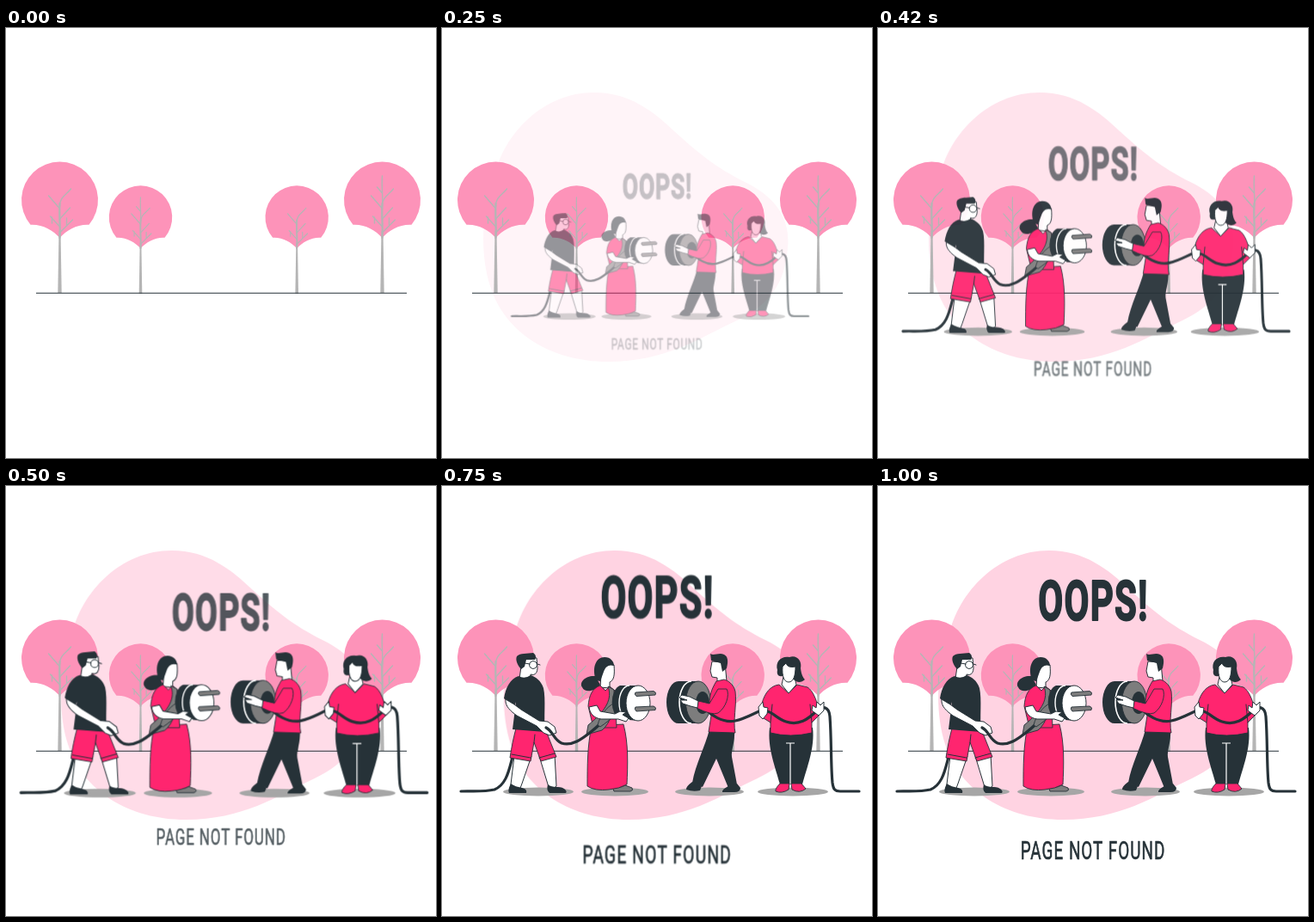
An HTML page that plays this animation: 500 by 500 pixels, repeating every 1040 ms.

```html
<!DOCTYPE html>
<html lang="en">
<head>
<meta charset="utf-8">
<title>Page not found</title>
<style>
  :root { --ink: #263238; --pink: #ff256f; --loop: 1040ms linear infinite; }
  html, body { margin: 0; width: 100%; height: 100%; overflow: hidden; background: #fff; }
  svg { display: block; width: 100%; height: 100%; }

  .reveal { animation: reveal var(--loop); }
  .blob { fill: #ffd3e2; animation: slide var(--loop); }
  .people { transform-origin: 253.5px 277px; animation: pop var(--loop); }
  .words { transform-origin: 250px 271px; animation: grow var(--loop); }

  @keyframes reveal {
    0% { visibility: hidden; animation-timing-function: step-end; }
    7.69%, 100% { visibility: visible; }
  }
  @keyframes slide {
    0% { opacity: 0; transform: translateX(-30px); animation-timing-function: cubic-bezier(.335, -.01, .487, 1.38); }
    93.75%, 100% { opacity: 1; transform: translateX(0); }
  }
  @keyframes grow {
    0% { opacity: 0; transform: scale(.5); animation-timing-function: cubic-bezier(.335, -.01, .487, 1.38); }
    93.75%, 100% { opacity: 1; transform: scale(1); }
  }
  @keyframes pop {
    0% { opacity: 0; transform: scale(.5); animation-timing-function: cubic-bezier(.34, -.01, .489, 1.38); }
    65.87%, 100% { opacity: 1; transform: scale(1); }
  }

  text {
    font-family: Roboto, "Liberation Sans", sans-serif; text-anchor: middle;
    fill: var(--ink); stroke: var(--ink); stroke-linejoin: round;
  }
  .title { font-size: 65.5px; font-weight: 700; letter-spacing: 2px; stroke-width: 2px; }
  .note { font-size: 29.5px; letter-spacing: 1.6px; stroke-width: .7px; }

  .d { fill: var(--ink); }
  .p { fill: var(--pink); stroke: var(--ink); stroke-width: .9; stroke-linejoin: round; }
  .w { fill: #fff; stroke: var(--ink); stroke-width: 1; stroke-linejoin: round; }
  .g { fill: #7d7d7d; stroke: var(--ink); stroke-width: .9; }
  .l { fill: none; stroke: var(--ink); stroke-width: 1; stroke-linecap: round; }
  .rope { fill: none; stroke: var(--ink); stroke-width: 3.2; stroke-linecap: round; stroke-linejoin: round; }
  .shade { fill: #a6a6a6; }
</style>
</head>
<body>
<svg viewBox="0 0 500 500">
  <defs>
    <g id="crown">
      <path fill="#fd93b9" d="M-34 28.7A44.5 44.5 0 1 1 34 28.7C20 28 8 35 0 44C-8 35-20 28-34 28.7Z"/>
      <path fill="#b5b5b5" d="M-1 36H1L2.2 108H-2.2Z"/>
    </g>
    <g id="twigs" fill="none" stroke="#b5b5b5" stroke-linecap="round">
      <path stroke-width="2.300" d="M0 44C1 30-1 20 0 4"/>
      <path stroke-width="1.4" d="M0 38L15 23M0 31L-11 19M0 22L12 9M0 10L-13-5M0 7C0-4 8-6 13-13M-9 27V20M8 21V29"/>
    </g>
    <g id="tree"><use href="#crown"/><use href="#twigs"/></g>
    <g id="tall">
      <use href="#tree"/>
      <path fill="none" stroke="#b5b5b5" stroke-width="1.4" stroke-linecap="round" d="M0 10C1-5-1-15 0-28M0-8L-6-15"/>
    </g>
  </defs>

  <g class="reveal">
    <path class="blob" d="M199 75C240 75 268 97 292 120C325 150 345 165 380 182C413 200 427 225 424 255C421 298 402 322 365 340C320 361 282 388 215 388C150 388 95 355 78 300C66 262 68 215 82 175C94 122 140 75 199 75Z"/>
  </g>

  <use href="#tree" x="62.5" y="200"/>
  <use href="#tall" transform="translate(156.5 220) scale(.825)"/>
  <use href="#tree" transform="translate(338.2 220) scale(.825)"/>
  <use href="#tall" x="437.5" y="200"/>
  <path d="M35 308.3H466" stroke="#263238" stroke-width="1.1"/>

  <g class="reveal">
    <g class="people">
      <g class="shade">
        <ellipse cx="112" cy="355.5" rx="41" ry="5"/>
        <ellipse cx="201" cy="355.5" rx="39" ry="5"/>
        <ellipse cx="311" cy="355.5" rx="40" ry="5"/>
        <ellipse cx="408" cy="355.5" rx="41" ry="5"/>
      </g>
      <path class="rope" d="M22 355C35 354.500 48 356 61 353C73 348 77 335 81 319C85 302 84 290 93 284"/>

      <!-- man with glasses -->
      <path class="w" d="M84 314L80 347L79 352L90 354L93 346L104 314Z"/>
      <path class="w" d="M113 314L124 350L128 353L133 349L131 312Z"/>
      <path class="d" d="M80 346C85 350 91 350 96 352Q99 354 98 357H78Q76 354 80 346ZM123 347C129 352 136 348 142 352Q146 355 144 357H125Q121 354 123 347Z"/>
      <path class="p" d="M86 282L121 285L133 315L115 320L107 298L103 320L79 316C81 303 83 293 86 282Z"/>
      <path class="l" d="M107 298L108 289M81 312L103 316M113 316L131 311"/>
      <path class="w" d="M92 210L90 224Q97 228 103 223L103 219C109 221 111 216 111 211L110 200L94 198Z"/>
      <path class="d" d="M89 221C79 224 74 235 72 247L84 257L86 251L82 283L120 286C118 270 121 248 118 235C115 226 109 222 103 220Q96 225 89 221Z"/>
      <path class="d" d="M87 198C91 194 99 195 106 194C109 196 110 199 108 202L98 202L96 210L92 213C88 209 85 202 87 198Z"/>
      <circle class="w" cx="106" cy="208" r="4.4"/>
      <path class="l" d="M96 206L102 207M111 207L114 208"/>
      <path class="w" d="M74 248C73 256 80 262 87 267L110 279L118 287L125 290L133 287L131 280L123 274L113 273L92 260L84 254Z"/>

      <!-- woman with plug -->
      <path class="g" d="M198 349Q207 352 213 348L221 351Q223 354 219 355H200Z"/>
      <path class="p" d="M174 279C169 302 169 326 169 349Q178 355 194 353Q206 352 215 347C216 325 217 299 211 277Z"/>
      <path class="d" d="M178 221C167 220 159 228 163 234C166 241 178 239 184 231Z"/>
      <path class="w" d="M185 220L184 234L195 235L195 228C200 226 201 220 200 208L187 206Z"/>
      <path class="p" d="M184 232C175 235 171 243 170 256L176 281L203 281L201 238L195 233L190 238Z"/>
      <path class="d" d="M179 226C174 211 179 199 189 199C196 199 200 204 200 209C194 207 190 210 188 216L184 227Z"/>
      <path class="g" d="M193 233C198 247 192 260 170 278L168 289L186 284C196 276 201 259 200 237Z"/>
      <path class="rope" d="M121 281C129 285 130 295 139 299C151 303 163 294 173 286C182 279 187 274 194 267"/>
      <path class="g" d="M181 278C184 266 191 258 199 253L202 266C196 271 190 276 184 280Z"/>
      <path class="d" d="M228 232H207A12 20 0 0 0 207 271L228 273Z"/>
      <path d="M218 232A12 20 0 0 0 218 272" fill="none" stroke="#fff" stroke-width="1.4"/>
      <ellipse class="w" cx="228" cy="252.5" rx="14" ry="20.5"/>
      <path class="g" d="M225 240L246 238.5Q250 240 248 243L226 244.5Q223 242 225 240ZM225 257L246 256Q250 257.500 248 260.500L226 262Q223 259 225 257Z"/>
      <path class="w" d="M171 257C172 266 178 270 185 271L205 271L214 274L217 270L210 266L214 263L207 262L201 265L184 262L180 255Z"/>

      <!-- socket -->
      <path class="d" d="M298 227H275A14 24.500 0 0 0 275 276H298Z"/>
      <path d="M290 227A14 24.500 0 0 0 290 276" fill="none" stroke="#fff" stroke-width="1.6"/>
      <ellipse class="g" cx="298" cy="251.500" rx="14.500" ry="24.500"/>
      <ellipse class="d" cx="303" cy="252" rx="8" ry="13"/>

      <!-- man with socket -->
      <path class="d" d="M311 283L340 284C341 298 336 307 337 315L343 347L333 351L319 317L303 350L291 345C295 323 306 303 311 283Z"/>
      <path class="d" d="M291 344L302 349L300 354Q292 356 284 353Q283 350 291 344ZM333 349L343 346L347 351Q347 356 340 356H326Q325 353 333 349Z"/>
      <path class="w" d="M314 204L312 215L314 222L320 223L320 230L331 227L329 205Z"/>
      <path class="p" d="M319 227C313 237 311 244 311 253L309 262L313 267L310 286L341 287C338 273 343 254 341 239C339 230 332 226 328 225Z"/>
      <path class="rope" d="M303 255C312 267 327 276 341 273C354 270 361 265 371 261"/>
      <path class="p" d="M331 236C335 243 330 258 321 264Q314 267 296 258L298 250L311 253L321 236Z"/>
      <path class="d" d="M312 195C316 198 322 193 328 196C334 199 332 207 331 212L326 216L324 206L313 203Z"/>
      <path class="w" d="M298 250L288 245L279 243L276 246L285 249L277 249L280 253L289 256L297 258Z"/>

      <!-- woman with cable -->
      <path class="d" d="M381 281H431C434 304 424 328 419 347H393C388 328 378 304 381 281Z"/>
      <path d="M405 347V299M400 299H410" fill="none" stroke="#fff" stroke-width="1.2"/>
      <path class="p" d="M393 346H404L403 353Q395 358 388 355Q387 352 393 346ZM406 346H418L423 352Q416 358 407 353Z"/>
      <path class="p" d="M392 231C382 232 375 241 372 253L369 267L382 275L382 287Q405 293 430 287L430 275L439 266C437 252 432 238 425 234L413 231L403 241Z"/>
      <path class="l" d="M384 254L382 275M428 254L430 275"/>
      <path class="w" d="M397 222L395 231L403 241L412 231L410 222Z"/>
      <path class="d" d="M390 214C387 204 395 197 404 199C413 196 419 204 417 212C418 220 420 223 422 225C417 230 411 228 408 224L396 221C391 222 389 219 390 214Z"/>
      <path class="w" d="M396 210C395 221 398 228 403 228C409 228 411 220 411 210Q402 212 400 206Z"/>
      <path class="rope" d="M371 263C382 258 387 270 400 274C415 279 426 271 435 262C442 255 450 256 451 268C453 295 452 325 454 345C455 353 457 355 463 355H485"/>
      <path class="w" d="M369 267L368 257L373 251L374 257L379 258L378 265L373 271ZM438 267L430 261L431 255L435 258L436 251L440 255L444 251L444 261Z"/>
    </g>

    <g class="words">
      <text class="title" transform="translate(250.500 156) scale(.64 1)">OOPS!</text>
      <text class="note" transform="translate(250 434) scale(.64 1)">PAGE NOT FOUND</text>
    </g>
  </g>
</svg>
</body>
</html>
```
